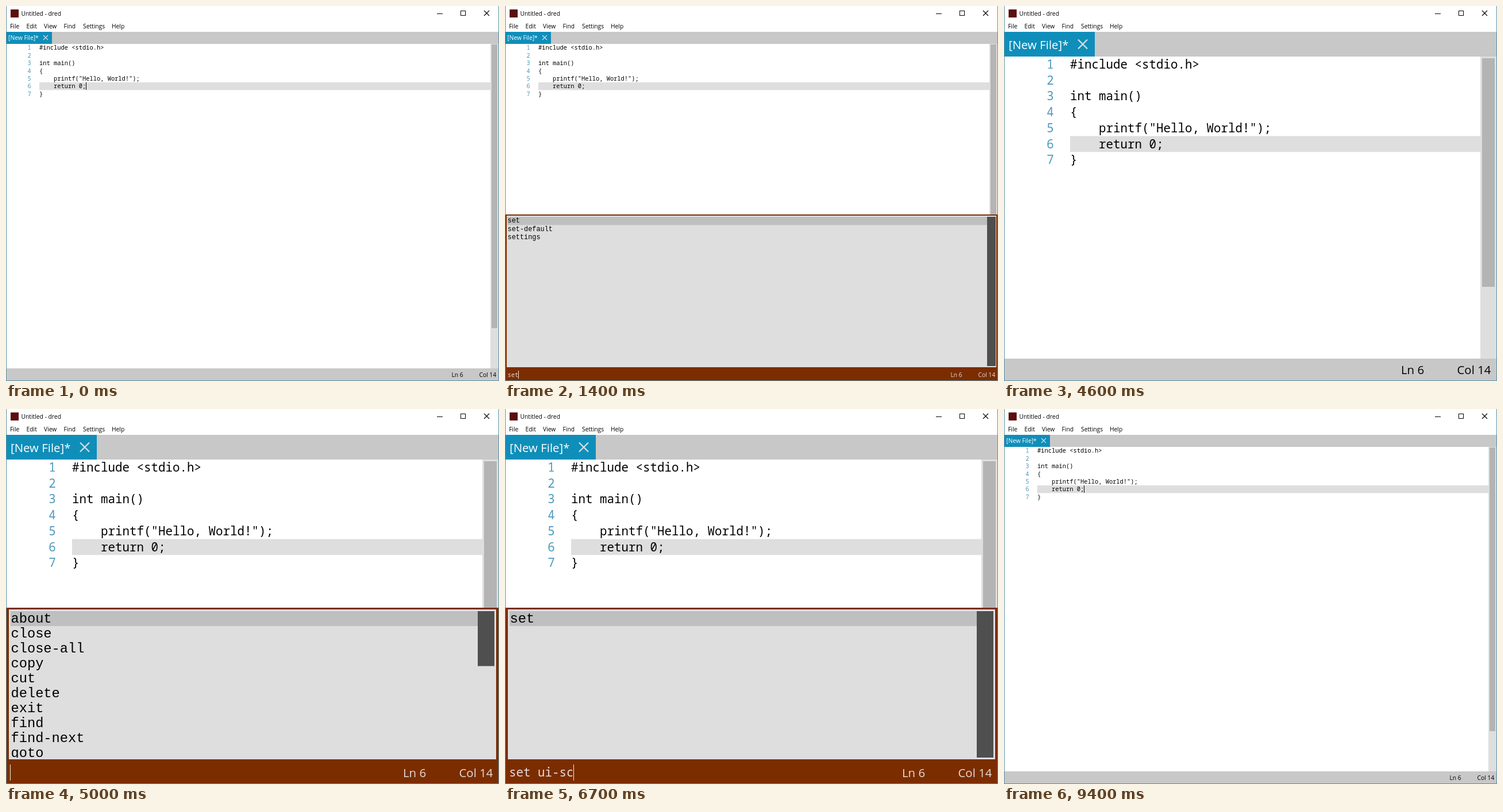
An HTML page with a canvas for the animation above (9500 ms loop, 858x653 px).

```html
<!DOCTYPE html>
<html lang="en">
<head>
<meta charset="utf-8">
<title>Untitled - dred</title>
<style>
html, body { margin: 0; width: 100%; height: 100%; overflow: hidden; background: #fff; }
canvas { display: block; width: 858px; height: 653px; }
</style>
</head>
<body>
<canvas id="stage" width="858" height="653"></canvas>
<script>
const ctx = document.getElementById('stage').getContext('2d');
const W = 858, H = 653, LOOP = 9500;
const UI = '"Open Sans", "Noto Sans", sans-serif';
const MONO = '"Noto Sans Mono", "DejaVu Sans Mono", monospace';
const LIST = '"Liberation Mono", monospace';
const GREY = '#c8c8c8', PALE = '#dedede', BROWN = '#7b2d00';

const code = ['#include <stdio.h>', '', 'int main()', '{',
  '    printf("Hello, World!");', '    return 0;', '}'];

const commands = ['about', 'close', 'close-all', 'copy', 'cut', 'delete', 'exit',
  'find', 'find-next', 'goto', 'new', 'open', 'paste', 'redo', 'replace',
  'replace-all', 'save', 'save-all', 'save-as', 'select-all', 'set',
  'set-default', 'settings', 'undo'];

// Layouts for the two interface scales
const small = {
  ui: 10.3, mono: 10.417, list: 11.9, adv: 6.25,
  tab: { w: 80, bottom: 66, x: 4, base: 59, cx: 69, cy: 55, r: 4, line: 1.2 },
  num: 37.4, codeX: 58, row: 13.4, base: 10.3,
  track: 843, thumb: [845, 67, 10, 494], status: 631, statusBase: 646, ln: 775.5, col: 823.5,
  panel: 363, edge: 2, pad: 2, item: 14.4, itemBase: 10.4, itemX: 4.5, bar: [839, 15],
  cmdX: 4.5, caretY: 635, caretH: 14
};
const large = {
  ui: 20.4, mono: 20.833, list: 23.7, adv: 12.5,
  tab: { w: 158, bottom: 88, x: 8, base: 75, cx: 137, cy: 66.5, r: 8, line: 2.4 },
  num: 74.3, codeX: 115, row: 27.7, base: 21,
  track: 829, thumb: [832, 91, 22, 398], status: 614, statusBase: 641, ln: 691, col: 788.5,
  panel: 346, edge: 4, pad: 3, item: 26, itemBase: 20, itemX: 8.5, bar: [821, 29],
  cmdX: 7, caretY: 619, caretH: 28
};

// Each session: the panel opens, keys arrive, the command runs
const sessions = [
  { open: 500, run: 3900, text: 'set ui-scale 2',
    keys: [1000, 1200, 1300, 1700, 1900, 2000, 2100, 2200, 2300, 2500, 2600, 2700, 3000, 3400] },
  { open: 5000, run: 8800, text: 'set ui-scale 1',
    keys: [5400, 5500, 5700, 5900, 6100, 6200, 6500, 6600, 6700, 6900, 7100, 7600, 7900, 8200] }
];

function rect(x, y, w, h, color) {
  ctx.fillStyle = color;
  ctx.fillRect(x, y, w, h);
}

function text(s, x, y, size, family, color) {
  ctx.font = size + 'px ' + family;
  ctx.fillStyle = color;
  ctx.fillText(s, x, y);
}

function cross(x, y, r, width, color) {
  ctx.strokeStyle = color;
  ctx.lineWidth = width;
  ctx.beginPath();
  ctx.moveTo(x - r, y - r); ctx.lineTo(x + r, y + r);
  ctx.moveTo(x + r, y - r); ctx.lineTo(x - r, y + r);
  ctx.stroke();
}

function drawFrame() {
  rect(0, 0, W, H, '#fff');
  rect(8, 6, 14, 14, '#5c0d0d');
  text('Untitled - dred', 26.5, 17, 10.3, UI, '#000');
  rect(750, 13, 10, 1, '#000');
  ctx.strokeStyle = '#000';
  ctx.lineWidth = 1;
  ctx.strokeRect(791.5, 8.5, 8, 8);
  cross(836.5, 12.5, 4.5, 1.1, '#000');
  const menu = { File: 7, Edit: 35.5, View: 66, Find: 100.5, Settings: 134, Help: 184 };
  for (const name in menu) text(name, menu[name], 39, 10.3, UI, '#000');
}

function drawEditor(L, caret) {
  const t = L.tab;
  rect(0, 45, W, t.bottom - 45, GREY);
  rect(1, 45, t.w - 1, t.bottom - 45, '#0f8eba');
  text('[New File]*', t.x, t.base, L.ui, UI, '#fff');
  cross(t.cx, t.cy, t.r, t.line, '#d4dde2');

  rect(L.codeX, t.bottom + 5 * L.row, L.track - L.codeX, L.row, PALE);
  code.forEach((line, i) => {
    const y = t.bottom + i * L.row + L.base;
    text(String(i + 1), L.num, y, L.mono, MONO, '#4f9aba');
    text(line, L.codeX, y, L.mono, MONO, '#000');
  });
  if (caret) {
    const x = Math.round(L.codeX + code[5].length * L.adv - 0.5);
    rect(x, Math.round(t.bottom + 5 * L.row), L === large ? 2 : 1, Math.round(L.row), '#000');
  }
  rect(L.track, t.bottom, W - L.track, L.status - t.bottom, PALE);
  rect(...L.thumb, '#b4b4b4');
}

function drawPanel(L, typed) {
  rect(0, L.panel, W, L.status - L.panel, BROWN);
  const x = 1 + L.edge, y = L.panel + L.edge - (L === large ? 1 : 0);
  const bottom = L.status - L.edge;
  rect(x, y, W - 1 - L.edge - x, bottom - y, PALE);

  const word = typed.split(' ')[0];
  const items = commands.filter(c => typed.includes(' ') ? c === word : c.startsWith(word));
  const picked = word ? Math.max(0, items.indexOf('set')) : 0;
  const top = y + L.pad, height = bottom - top - L.pad;
  const [barX, barW] = L.bar;

  ctx.save();
  ctx.beginPath();
  ctx.rect(x, top, barX - x, height);
  ctx.clip();
  rect(L === large ? 8 : 4, top + picked * L.item, barX, L.item, '#bfbfbf');
  items.forEach((c, i) =>
    text(c, L.itemX, top + i * L.item + L.itemBase, L.list, LIST, '#000'));
  ctx.restore();

  const shown = Math.floor(height / L.item);
  rect(barX, top, barW, height * Math.min(1, shown / items.length), '#4f4f4f');
}

function drawStatus(L, active, typed) {
  const ink = active ? '#e2dcd8' : '#000';
  rect(0, L.status, W, H - L.status, active ? BROWN : GREY);
  text('Ln 6', L.ln, L.statusBase, L.ui, UI, ink);
  text('Col 14', L.col, L.statusBase, L.ui, UI, ink);
  if (!active) return;
  text(typed, L.cmdX, L.statusBase - (L === large ? 1 : 0), L.mono, MONO, ink);
  rect(Math.round(L.cmdX + typed.length * L.adv - 0.5), L.caretY, 1, L.caretH, '#f0ece8');
}

function draw(t) {
  const L = t >= sessions[0].run && t < sessions[1].run ? large : small;
  const live = sessions.find(s => t >= s.open && t < s.run);
  const typed = live ? live.text.slice(0, live.keys.filter(k => k <= t).length) : '';
  const caret = !live && !(t >= 4600 && t < 5000);

  drawFrame();
  drawEditor(L, caret);
  if (live) drawPanel(L, typed);
  drawStatus(L, !!live, typed);

  const border = '#5e8fa3';
  rect(0, 0, 1, H, border);
  rect(W - 1, 0, 1, H, border);
  rect(0, H - 1, W, 1, border);
}

function tick() {
  draw(performance.now() % LOOP);
  requestAnimationFrame(tick);
}
tick();
</script>
</body>
</html>
```
